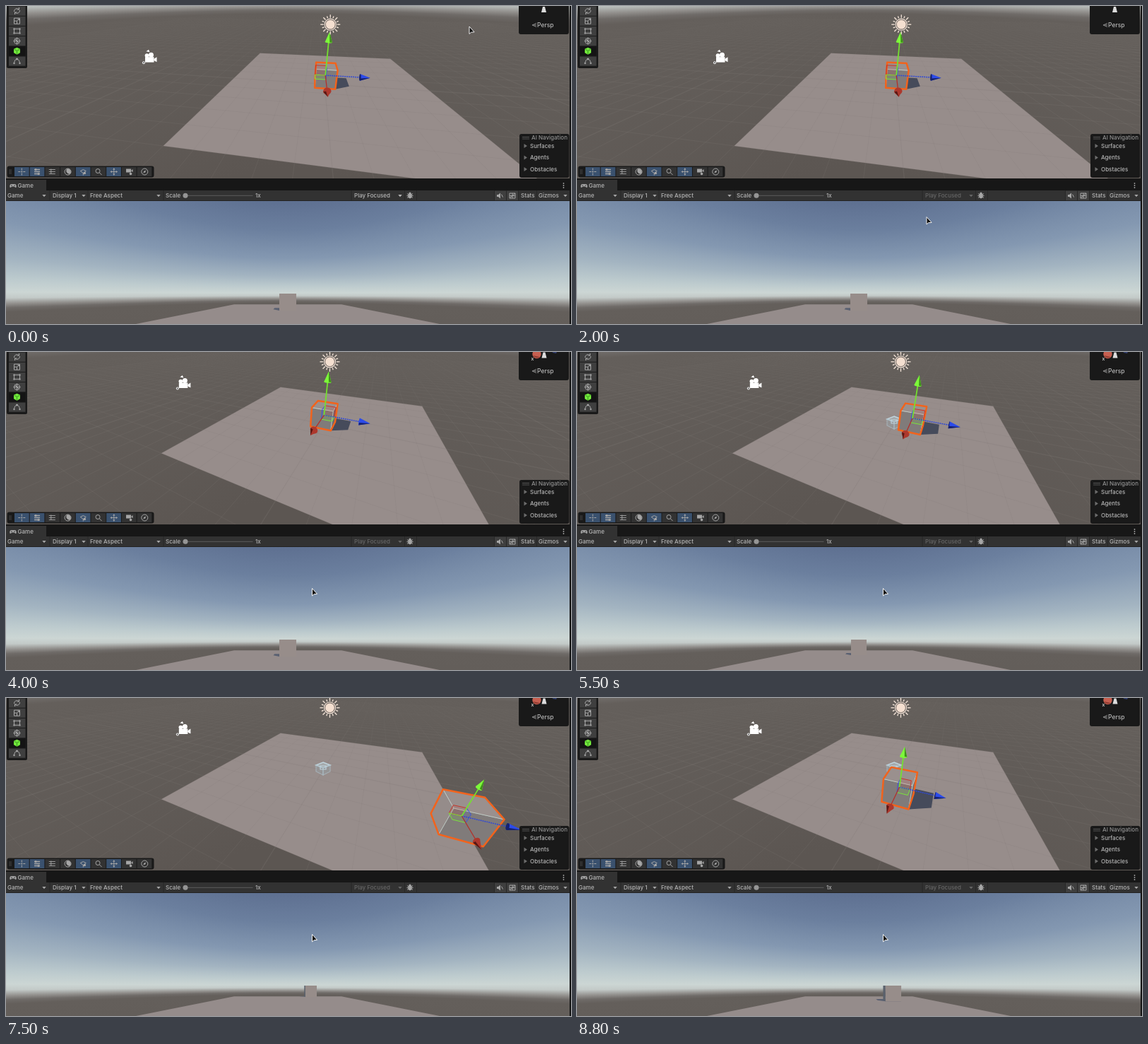
An HTML page with a canvas that plays this animation: 800 by 450 pixels, repeating every 8.9 s.

```html
<!DOCTYPE html>
<html lang="en">
<head>
<meta charset="utf-8">
<title>Scene and game view</title>
<style>
html, body { margin: 0; width: 800px; height: 450px; overflow: hidden; background: #191919; }
canvas, svg { position: absolute; left: 0; top: 0; display: block; }
text { font: 500 8px Inter, sans-serif; fill: #b6b6b6; }
</style>
</head>
<body>
<canvas id="world" width="800" height="450"></canvas>
<svg id="ui" width="800" height="450" viewBox="0 0 800 450"></svg>
<script>
const LOOP = 8900;
const ctx = document.getElementById('world').getContext('2d');
const ui = document.getElementById('ui');

// ---------- keyed values ----------
function at(t, keys) {
  if (t <= keys[0][0]) return keys[0].slice(1);
  for (let i = 1; i < keys.length; i++) {
    const a = keys[i - 1], b = keys[i];
    if (t <= b[0]) {
      const k = (t - a[0]) / (b[0] - a[0]);
      return a.slice(1).map((v, j) => v + (b[j + 1] - v) * k);
    }
  }
  return keys[keys.length - 1].slice(1);
}
// time, yaw, pitch, screen x and y of the world centre, distance
const ORBIT = [[2700, 8.6, 24.5, 451, 110.5, 9.08], [3200, 15.6, 25.8, 471, 106.2, 8.6], [3620, 25.2, 27.9, 449, 102, 8.8]];
// time, x, z
const WALK = [[5220, 0, 0], [6800, 0, 4.73], [7490, 2.05, 4.73], [8800, 2.2, 0.75], [8900, 2.2, 0.45]];
const POINTER = [[500, 656, 29], [1000, 640, 70], [1600, 495, 298.5], [2250, 495, 298.5], [2650, 430, 175],
  [3200, 459, 194], [3620, 478, 206], [3900, 433.5, 334.5]];

// ---------- 3D ----------
const dot = (a, b) => a[0] * b[0] + a[1] * b[1] + a[2] * b[2];
const add = (a, b, k = 1) => a.map((v, i) => v + b[i] * k);

const gameView = { eye: [0, 1, -10], R: [1, 0, 0], U: [0, 1, 0], F: [0, 0, 1], cx: 399, cy: 407, f: 228, horizon: 407 };

function orbitView(t) {
  const [yaw, pitch, ox, oy, d] = at(t, ORBIT);
  const a = yaw * Math.PI / 180, p = pitch * Math.PI / 180;
  const f = 246, cx = 399, cy = 102, s = Math.sin(p), c = Math.cos(p);
  const fx = -Math.cos(a), fz = -Math.sin(a);
  const R = [fz, 0, -fx], U = [fx * s, c, fz * s], F = [fx * c, -s, fz * c];
  let eye = [0, 0, 0];
  eye = add(eye, R, -(ox - cx) / f * d);
  eye = add(eye, U, -(cy - oy) / f * d);
  eye = add(eye, F, -d);
  return { eye, R, U, F, cx, cy, f, horizon: cy - f * s / c };
}
function project(v, p) {
  const q = add(p, v.eye, -1), z = dot(q, v.F);
  return [v.cx + v.f * dot(q, v.R) / z, v.cy - v.f * dot(q, v.U) / z, z];
}
function hull(pts) {
  const s = pts.slice().sort((a, b) => a[0] - b[0] || a[1] - b[1]);
  const half = list => {
    const h = [];
    for (const p of list) {
      while (h.length > 1) {
        const [a, b] = h.slice(-2);
        if ((b[0] - a[0]) * (p[1] - a[1]) - (b[1] - a[1]) * (p[0] - a[0]) > 0) break;
        h.pop();
      }
      h.push(p);
    }
    return h.slice(0, -1);
  };
  return half(s).concat(half(s.reverse()));
}
function trace(pts) {
  ctx.beginPath();
  pts.forEach(p => ctx.lineTo(p[0], p[1]));
  ctx.closePath();
}
function poly(pts, fill, stroke, w) {
  trace(pts);
  if (fill) { ctx.fillStyle = fill; ctx.fill(); }
  if (stroke) { ctx.strokeStyle = stroke; ctx.lineWidth = w; ctx.stroke(); }
}
function line(a, b, stroke, w, dash = []) {
  ctx.setLineDash(dash);
  ctx.strokeStyle = stroke; ctx.lineWidth = w;
  ctx.beginPath(); ctx.moveTo(a[0], a[1]); ctx.lineTo(b[0], b[1]); ctx.stroke();
  ctx.setLineDash([]);
}

// ---------- world parts ----------
// pixels below the horizon in the middle column, colour
const SKY = [[-131, '#5e7091'], [-90, '#6b7f9e'], [-50, '#8498b1'], [-25, '#a3b4c1'], [-10, '#bdcbce'], [-1, '#ccd6d4'],
  [3, '#c3cac8'], [7, '#93918e'], [10, '#6f6b68'], [13, '#645f5b'], [150, '#5c5652']];

function backdrop(v, top, bottom, k) {
  for (let x = 0; x < 800; x += 4) {
    const s = k * Math.hypot(1, (x + 2 - v.cx) / v.f);
    const y0 = v.horizon - 131 * s, y1 = v.horizon + 150 * s;
    const g = ctx.createLinearGradient(0, y0, 0, y1);
    SKY.forEach(([o, c]) => g.addColorStop((o + 131) / 281, c));
    ctx.fillStyle = g;
    ctx.fillRect(x, top, 4, bottom - top);
  }
}
function grid(v, rgb, alpha) {
  const g = ctx.createLinearGradient(0, v.horizon + 12, 0, v.horizon + 130);
  g.addColorStop(0, `rgba(${rgb},0)`);
  g.addColorStop(1, `rgba(${rgb},${alpha})`);
  const near = 0.3, depth = p => dot(add(p, v.eye, -1), v.F);
  const seg = (a, b, w) => {
    const da = depth(a), db = depth(b);
    if (da < near && db < near) return;
    const cut = add(a, add(b, a, -1), (near - da) / (db - da));
    if (da < near) a = cut; else if (db < near) b = cut;
    line(project(v, a), project(v, b), g, w);
  };
  for (let i = -30; i <= 30; i++) {
    const w = i % 10 ? 0.8 : 1.3;
    seg([i, 0, -40], [i, 0, 40], w);
    seg([-40, 0, i], [40, 0, i], w);
  }
}
const floorPts = v => [[-5, -5], [-5, 5], [5, 5], [5, -5]].map(([x, z]) => project(v, [x, 0, z]));

function corners(c) {
  const out = [];
  for (const x of [-.5, .5]) for (const y of [-.5, .5]) for (const z of [-.5, .5]) out.push(add(c, [x, y, z]));
  return out;
}
function shadow(v, c, color) {
  const pts = corners(c).map(p => project(v, [p[0] - 0.42 * p[1], 0, p[2] + 0.727 * p[1]]));
  poly(hull(pts), color);
}
function box(v, c, colors, wire) {
  for (let a = 0; a < 3; a++) {
    for (const s of [-1, 1]) {
      if (s * (v.eye[a] - c[a]) <= 0.501) continue;
      const face = [[-.5, -.5], [-.5, .5], [.5, .5], [.5, -.5]].map(([m, n]) => {
        const p = c.slice();
        p[a] += s * .5; p[(a + 1) % 3] += m; p[(a + 2) % 3] += n;
        return project(v, p);
      });
      poly(face, colors[a * 2 + (s > 0)], wire, 0.9);
    }
  }
}
function cone(v, c, axis, len, color, dark) {
  const pb = add(c, axis, len * 0.78), b = project(v, pb), e = project(v, add(c, axis, len));
  const r = v.f * 0.078 * len / b[2], dx = e[0] - b[0], dy = e[1] - b[1], n = Math.hypot(dx, dy) || 1;
  const q = add(pb, v.eye, -1), flat = Math.abs(dot(q, axis)) / Math.sqrt(dot(q, q));
  const nx = -dy / n * r, ny = dx / n * r;
  const away = dot(q, axis) > 0;
  const base = fill => {
    ctx.fillStyle = fill;
    ctx.beginPath();
    ctx.ellipse(b[0], b[1], r, Math.max(r * flat, 0.6), Math.atan2(ny, nx), 0, 7);
    ctx.fill();
  };
  if (!away) base(color);
  poly([[b[0] + nx, b[1] + ny], e, [b[0] - nx, b[1] - ny]], color);
  poly([[b[0] + nx, b[1] + ny], e, [b[0] + nx * .3, b[1] + ny * .3]], dark);
  if (away) base(dark);
}
function handles(v, c) {
  const o = project(v, c), len = 0.245 * o[2];
  const X = [1, 0, 0], Y = [0, 1, 0], Z = [0, 0, 1];
  const side = [X, Y, Z].map((d, i) => d.map(n => n * Math.sign(v.eye[i] - c[i]) * len * 0.24));
  [[1, 2, '#c8362a'], [0, 2, '#7be33c'], [0, 1, '#3a55d8']].forEach(([i, j, col]) => {
    const a = add(c, side[i]), b = add(a, side[j]), d = add(c, side[j]);
    poly([c, a, b, d].map(p => project(v, p)), col + '22', col, 1);
  });
  const end = d => project(v, add(c, d, len * 0.8));
  line(o, end(Z), '#2f49d6', 1.5, [2, 1]);
  line(o, end(X), '#b3302a', 1.3);
  line(o, end(Y), '#74e02f', 1.8);
  cone(v, c, Z, len, '#2c4bea', '#16226e');
  cone(v, c, Y, len, '#7df83a', '#3f8f1c');
  cone(v, c, X, len, '#ad382d', '#571714');
}
function disc(x, y, r, fill) {
  ctx.fillStyle = fill;
  ctx.beginPath(); ctx.arc(x, y, r, 0, 7); ctx.fill();
}
function sunIcon([x, y]) {
  for (let i = 0; i < 16; i++) {
    const a = i * Math.PI / 8, r = i % 2 ? 12.5 : 14;
    const p = q => [x + q * Math.cos(a), y + q * Math.sin(a)];
    line(p(9.5), p(r), '#f6e6da', 1.3);
  }
  disc(x, y, 8.6, '#f6e6da');
  disc(x, y, 7.5, '#7c716b');
  disc(x, y, 6.4, '#f4dfd0');
}
function cameraIcon([x, y]) {
  disc(x - 4, y - 2, 2.8, '#fff');
  disc(x + 2, y - 3, 3.5, '#fff');
  ctx.fillStyle = '#fff';
  ctx.fillRect(x - 6.5, y, 12.5, 7.5);
  poly([[x + 6, y + 2.5], [x + 10, y], [x + 10, y + 7], [x + 6, y + 5]], '#fff');
  poly([[x - 5, y - 8], [x - 1.5, y - 10.5], [x, y - 7]], '#fff');
  disc(x - 8.5, y + 8, 2, '#e8e8e8');
  disc(x - 8.5, y + 8, 0.9, '#555');
}
function originIcon([x, y]) {
  const P = (...n) => n.map(([a, b]) => [x + a, y + b - 2]);
  const col = '#bfd3dc';
  poly(P([0, -9], [10, -5], [0, -1], [-10, -5]), '#a5a9ab', col, 1.6);
  poly(P([-10, -5], [0, -1], [0, 9], [-10, 4]), 'rgba(150,165,172,.35)', 'rgba(175,195,205,.6)', 1.2);
  poly(P([10, -5], [0, -1], [0, 9], [10, 4]), 'rgba(150,165,172,.35)', 'rgba(175,195,205,.6)', 1.2);
  poly(P([-4, -4], [4, -4], [4, 1], [-4, 1]), null, col, 1.2);
}
function clipRect(y, h, draw) {
  ctx.save();
  ctx.beginPath(); ctx.rect(0, y, 798, h); ctx.clip();
  draw();
  ctx.restore();
}
function scene(v, c) {
  backdrop(v, 0, 244, 1.6);
  grid(v, '150,145,140', 0.15);
  const floor = floorPts(v);
  poly(floor, '#978d8b');
  ctx.save();
  trace(floor); ctx.clip();
  grid(v, '80,72,72', 0.08);
  shadow(v, c, '#464b5b');
  ctx.restore();
  cameraIcon(project(v, [0, 1, -10]));
  originIcon(project(v, [0, 0, 0]));
  box(v, c, ['#807a79', '#807b7a', '#777', '#9a908e', '#958c8a', '#6b6b71'], 'rgba(208,224,216,.7)');
  ctx.lineJoin = 'round';
  poly(hull(corners(c).map(p => project(v, p))), null, '#f2631c', 2.5);
  ctx.lineJoin = 'miter';
  handles(v, c);
  sunIcon(project(v, [0, 3, 0]));
}
function game(c) {
  const v = gameView;
  backdrop(v, 276, 450, 1);
  poly(floorPts(v), '#958c8b');
  ctx.save();
  trace(floorPts(v)); ctx.clip();
  shadow(v, c, '#596071');
  ctx.restore();
  box(v, c, ['#5a616c', '#5a616c', '#777', '#aaa', '#978d8a', '#777']);
}

// ---------- interface ----------
const BAR = '#323232', CELL = '#3f3f3f', ICON = '#a6a6a6';
const rect = (x, y, w, h, fill, rx = 0) => `<rect x="${x}" y="${y}" width="${w}" height="${h}" rx="${rx}" fill="${fill}"/>`;
const label = (x, y, s, extra = '') => `<text x="${x}" y="${y + 2.9}" ${extra}>${s}</text>`;
const stroke = (d, c = ICON, w = 1) => `<path d="${d}" fill="none" stroke="${c}" stroke-width="${w}"/>`;
const fill = (d, c = ICON) => `<path d="${d}" fill="${c}"/>`;
const spot = (x, y, r, c = ICON) => `<circle cx="${x}" cy="${y}" r="${r}" fill="${c}"/>`;
const drop = (x, id = '') => `<path ${id} d="M${x - 2.7} 267h5.4l-2.7 3.2z" fill="${ICON}"/>`;
const put = (x, y, s) => `<g transform="translate(${x} ${y})">${s}</g>`;

function leftTools() {
  const icons = [
    stroke('M-4 1a4 4 0 0 1 7-3M4-1a4 4 0 0 1-7 3M3-5v3h-3M-3 5v-3h3'),
    stroke('M-4-4h8v8h-8zM-4 0h4v4M0 0l3-3M1-3h2v2'),
    stroke('M-4-3h8v6h-8z') + [-4, 4].map(x => spot(x, -3, 1.2) + spot(x, 3, 1.2)).join(''),
    stroke('M-4 0a4 4 0 1 1 8 0a4 4 0 1 1-8 0M-5 0h10M0-5v10M-3-3l6 6'),
    fill('M0-5l4.5 2v5.5l-4.5 2.5l-4.5-2.5v-5.5z', '#72e83c') + stroke('M-4-2.5l4 2l4-2M0-.5v5', '#2c8517', 0.8),
    stroke('M-4 4c0-4 2-7 4-7s4 3 4 7') + spot(0, -3, 1.5) + spot(-4, 3, 1.2) + spot(4, 3, 1.2)
  ];
  return rect(1, -4, 29, 92, '#1a1a1a', 2) + icons.map((s, i) =>
    rect(4, 0.5 + i * 14.2, 23.5, 13.2, i === 4 ? '#141414' : CELL) + put(15.5, 7 + i * 14.2, s)).join('');
}
function bottomTools() {
  const move = stroke('M-5 0h10M0-5v10', ICON, 0.9) + fill('M-5 0l2-1.7v3.4zM5 0l-2-1.7v3.4zM0-5l-1.7 2h3.4zM0 5l-1.7-2h3.4z');
  const ring = 'M-4.5 0a4.5 4.5 0 1 1 9 0a4.5 4.5 0 1 1-9 0';
  const icons = [
    stroke('M-5 0h3M2 0h3M0-5v3M0 2v3') + spot(0, 0, 1),
    stroke('M-4-3h8M-4 0h8M-4 3h8', ICON, 1.4) + spot(-2, -3, 1.6) + spot(2, 3, 1.6),
    stroke('M-5-3h9M-5 0h9M-5 3h9M-2-4v7', ICON, 0.9),
    stroke(ring) + fill('M-1-4.3a4.5 4.5 0 0 0 4 7.5a4.5 4.5 0 0 0-4-7.5'),
    stroke('M-4-1l4-2l4 2l-4 3zM0 2v3') + spot(2, 2, 1.8),
    stroke('M-4-1a3 3 0 1 1 6 0a3 3 0 1 1-6 0M1.5 1.5l3 3'),
    move,
    rect(-4.5, -4, 7, 5, ICON) + fill('M3-2l2-1.5v4l-2-1z') + spot(2, 3, 1.8),
    stroke(ring + 'M-2 2l4-4') + spot(0, 0, 1.2)
  ];
  return rect(1.5, 226.5, 208, 16, '#191919', 3) + stroke('M5 231v7M7 231v7', '#444') +
    icons.map((s, i) => rect(12 + i * 21.7, 228, 20.7, 13, [0, 1, 4, 6].includes(i) ? '#3a516e' : '#323232') +
      put(22.3 + i * 21.75, 234.5, s)).join('');
}
function panels() {
  return rect(726, -4, 71, 44, '#191919', 3) + rect(727, 181, 70.5, 62, '#191919', 3) +
    stroke('M751 24.5l-6 2.5l6 2.5M747 27h4', '#969696', 0.9) + label(752, 27, 'Persp', 'style="font-size:8.5px"') +
    stroke('M731 185.5h10M731 188h10', '#555') + label(744, 186.5, 'AI Navigation', 'style="fill:#929292"') +
    ['Surfaces', 'Agents', 'Obstacles'].map((s, i) => {
      const y = 198 + i * 16.5;
      return fill(`M733.5 ${y - 3}v6l4.5-3z`, '#6c6c6c') + label(742, y, s);
    }).join('');
}
function gameBar() {
  return rect(0, 244, 800, 17, '#171717') + rect(0, 246, 57, 15, BAR) + rect(0, 261, 798, 15, BAR) +
    rect(0, 275, 798, 1, '#232323') + rect(798, 0, 2, 450, '#151515') +
    fill('M7.500 252h5c2 0 2.5 2.500 2 4.500c-.5 1-2 0-2.5-1h-4c-.5 1-2 2-2.5 1c-.5-2 0-4.500 2-4.500z') + spot(8, 254, .8, BAR) + spot(12, 254, .8, BAR) +
    label(16.5, 254, 'Game') + [251, 254, 257].map(y => spot(789.5, y, 0.9)).join('') +
    [61.5, 115.5, 222.5, 488.5, 564, 581, 691, 708, 725, 751].map(x => rect(x, 261, 1, 14, '#272727')).join('') +
    label(2, 268, 'Game') + drop(54) + label(66, 268, 'Display 1') + drop(110) +
    label(119, 268, 'Free Aspect') + drop(216) + label(226, 268, 'Scale') +
    rect(254, 267.8, 95.5, 1, '#5c5c5c') + spot(254, 268.3, 3.5, '#959595') + label(353, 268, '1x') +
    label(493, 268, 'Play Focused', 'id="play"') + drop(558, 'id="playDrop"') +
    put(572, 268.5, stroke('M-4-3l8 6M4-3l-8 6M-4.5 0h9') + `<ellipse rx="2.7" ry="3.8" fill="${ICON}"/>` + spot(0, -3.5, 1.6)) +
    rect(692, 262, 16, 13, CELL) + put(699, 268.5, fill('M-4-1.5h2l3-2.5v8l-3-2.5h-2z') + stroke('M2.5-2l2 4')) +
    rect(709, 262, 16, 13, CELL) + put(717, 268.5, stroke('M-4-3.5h8v7h-8zM-4 0h8M0-3.5v7M-4 3.5l8-7')) +
    label(729, 268, 'Stats') + label(754, 268, 'Gizmos') + drop(792);
}
const compass = '<g id="red"><circle r="6.2" fill="#c65f50"/><path d="M-5 2a6 6 0 0 0 9 2z" fill="#8f3a30"/></g>' +
  '<g id="blue"><path d="M-4-3l8 0l-2 4l-5-1z" fill="#34406f"/></g>' +
  '<path id="white" d="M-3.5 5h7l-2-8h-3z" fill="#dcdcdc"/>' +
  '<text id="axis" x="743.5" y="12" style="font-size:7px;fill:#ddd">x</text>';
const pointers = `<g id="arrow"><path d="M0 0l0 10.5l2.6-2.3l4.5-.3z" fill="#0c0c0c" stroke="#f2f2f2" stroke-width="1" stroke-linejoin="round"/></g>
  <g id="eye"><path d="M-6.5 0q6.5-9 13 0q-6.500 9-13 0z" fill="#fff" stroke="#333" stroke-width=".8"/><circle r="2.4" fill="#fff" stroke="#333"/>
  <path d="M5 3.5v6M2 6.500h6" stroke="#eee" stroke-width="2.2"/><path d="M5 3.8v5.4M2.300 6.500h5.400" stroke="#222"/></g>`;

ui.innerHTML = leftTools() + bottomTools() + panels() + compass + gameBar() + pointers;
const el = id => document.getElementById(id);
const move = (id, x, y) => el(id).setAttribute('transform', `translate(${x} ${y})`);
const show = (id, on) => el(id).setAttribute('visibility', on ? 'visible' : 'hidden');

function render(t) {
  const [x, z] = at(t, WALK), c = [x, 0.5, z], v = orbitView(t);
  clipRect(0, 244, () => scene(v, c));
  clipRect(276, 174, () => game(c));

  move('red', ...at(t, [[2700, 761, -8], [3200, 756, 4], [3620, 751.5, 3]]));
  move('blue', ...at(t, [[2700, 795, -9], [3200, 786, -5], [3620, 777, 1]]));
  move('white', ...at(t, [[2700, 761.5, 4], [3200, 762, 1], [3620, 762, 3.5]]));
  show('axis', t > 3350);

  const dim = t >= 300 ? '#666' : '#b6b6b6';
  el('play').style.fill = el('playDrop').style.fill = dim;

  const looking = t >= 2650 && t < 3620, p = at(t, POINTER);
  show('arrow', !looking);
  show('eye', looking);
  move(looking ? 'eye' : 'arrow', p[0], p[1]);
}
function tick(now) {
  render(now % LOOP);
  requestAnimationFrame(tick);
}
render(0);
requestAnimationFrame(tick);
</script>
</body>
</html>
```
